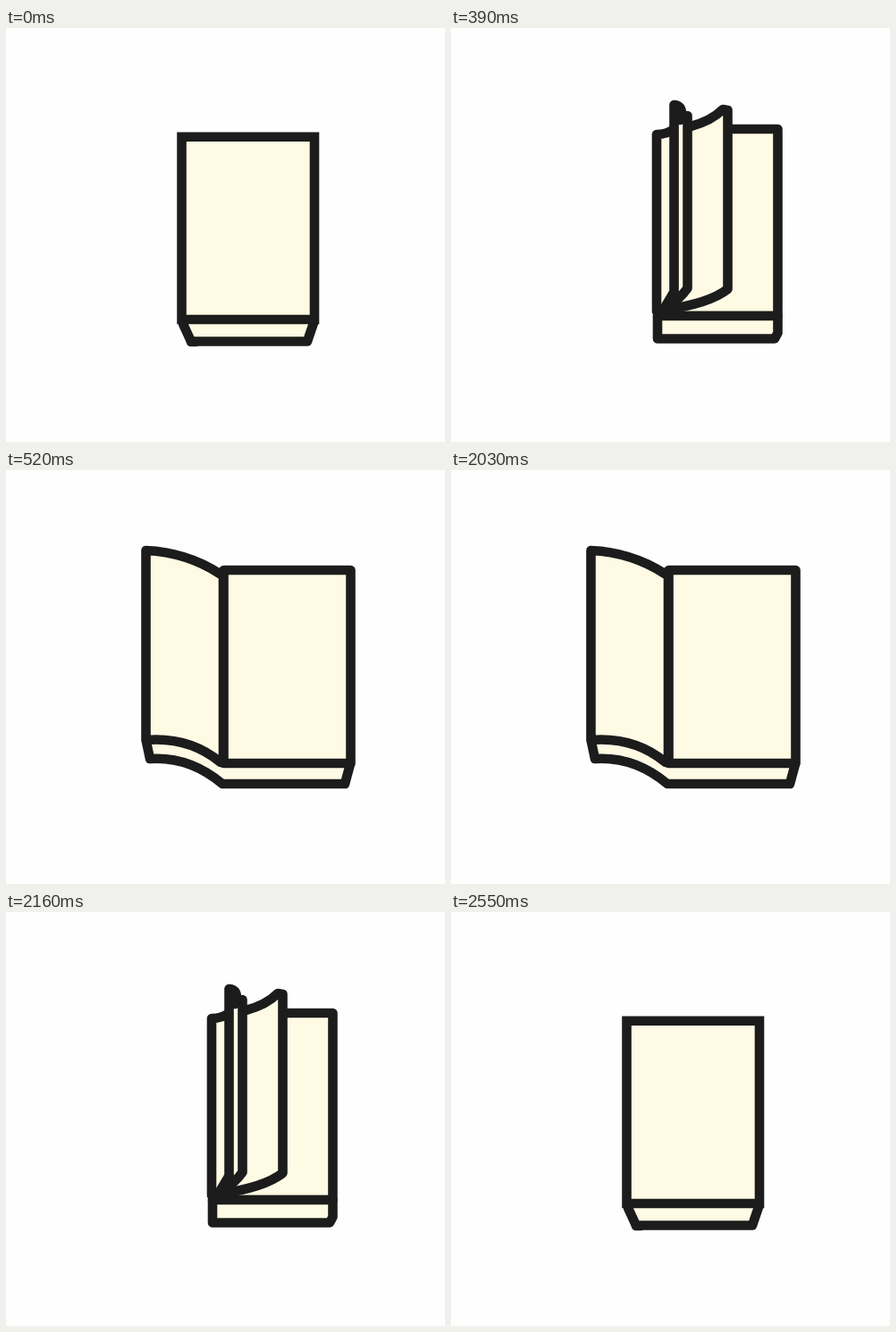
An HTML page for the animation above (3.43 s loop, 491 px wide and 463 px high).

```html
<!DOCTYPE html>
<html lang="en">
<head>
<meta charset="utf-8">
<title>Opening book</title>
<style>
  html, body { margin: 0; width: 100%; height: 100%; overflow: hidden; background: #fefefe; }
  svg { display: block; width: 491px; height: 463px; }
  .pose { visibility: hidden; fill: none; stroke: #1b1c1b; stroke-width: 10.6; stroke-linecap: round; stroke-linejoin: round; }
  .paper { fill: #fffae4; }
  .bare { stroke: none; }
  .square { stroke-linejoin: miter; }
</style>
</head>
<body>
<svg viewBox="0 0 491 463">
  <defs>
    <clipPath id="column"><rect x="134" y="100" width="83" height="190"/></clipPath>
    <g id="half">
      <path class="paper bare" d="M104 302L115.5 320C162 315 204 318 227 349H242V330Z"/>
      <path class="square" d="M104 301L115.5 320L124 319.3"/>
      <path d="M124 319.3C166 317 206 321 227 349H242"/>
      <path class="paper" d="M103.5 88C165 80 213 91 242 126V330C210 298 165 292 103.5 298Z"/>
      <g clip-path="url(#column)">
        <path d="M128 119C165 118 193 124 222 145"/>
        <path d="M128 155C162 154 186 161 209 177"/>
        <path d="M128 184C162 183 188 193 211 211"/>
        <path d="M128 219C162 219 188 229 212 245"/>
        <path d="M128 257C162 256 188 260 208 274"/>
      </g>
    </g>
  </defs>

  <g class="pose">
    <path class="paper" d="M198 331L207 350.5H337L344 330"/>
    <path d="M207 351H212"/>
    <path class="paper square" d="M196.5 121.7H345V326H196.5Z"/>
  </g>

  <g class="pose">
    <path class="paper" d="M207 326L210 350H347L352 326"/>
    <path class="paper" d="M206 119H352V325H206Z"/>
    <path class="paper" d="M206 119Q285 119 338 104V313Q285 325 206 325Z"/>
  </g>

  <g class="pose">
    <path class="paper" d="M218 323V349H356L359 323"/>
    <path class="paper" d="M218 116H359V323H218Z"/>
    <path class="paper" d="M218 118Q285 117 326 96V302Q285 321 218 321Z"/>
    <path d="M218 118Q267 115 292 101V300Q268 318 222 321"/>
  </g>

  <g class="pose">
    <path class="paper" d="M309 113H365.5V322H231"/>
    <path class="paper" d="M231 322H365.5V341L362 347.5H231Z"/>
    <path class="paper bare" d="M230 119Q242 119 249 113L268 111Q291 104 304 91H309.5V292Q289 308 240 316L230 317Z"/>
    <path d="M249 113Q242 119 230 119V317M268 110Q291 104 304 91L309.5 92V292Q289 308 240 315"/>
    <path d="M249.5 86V295L237 316M264.5 98V291Q257 302 238 316"/>
    <path d="M250 86Q258 87 258 96L256 103M246 304L239 314"/>
  </g>

  <g class="pose">
    <path class="paper bare" d="M157 302L161 323Q205 320 242 351H379L385 329L243 327Q205 298 157 302Z"/>
    <path d="M157 304L161 323Q205 320 242 351H379L385 329"/>
    <path class="paper" d="M239 116Q202 92 156.5 90V302Q205 298 240 327L243 323V116"/>
    <path class="paper" d="M243.5 112H385.5V328H243.5Z"/>
  </g>

  <g class="pose">
    <use href="#half"/>
    <use href="#half" transform="matrix(-1 0 0 1 484 0)"/>
  </g>
</svg>
<script>
  const LOOP = 3430, STEP = 130, CLOSE_AT = 2030;
  const poses = [...document.querySelectorAll('.pose')];
  const open = poses.length - 1;

  function poseAt(t) {
    return t < CLOSE_AT
      ? Math.min(open, Math.floor(t / STEP))
      : Math.max(0, open - 1 - Math.floor((t - CLOSE_AT) / STEP));
  }

  function draw(now) {
    const current = poseAt(now % LOOP);
    poses.forEach((pose, i) => {
      pose.style.visibility = i === current ? 'visible' : 'hidden';
    });
    requestAnimationFrame(draw);
  }

  draw(performance.now());
</script>
</body>
</html>
```
